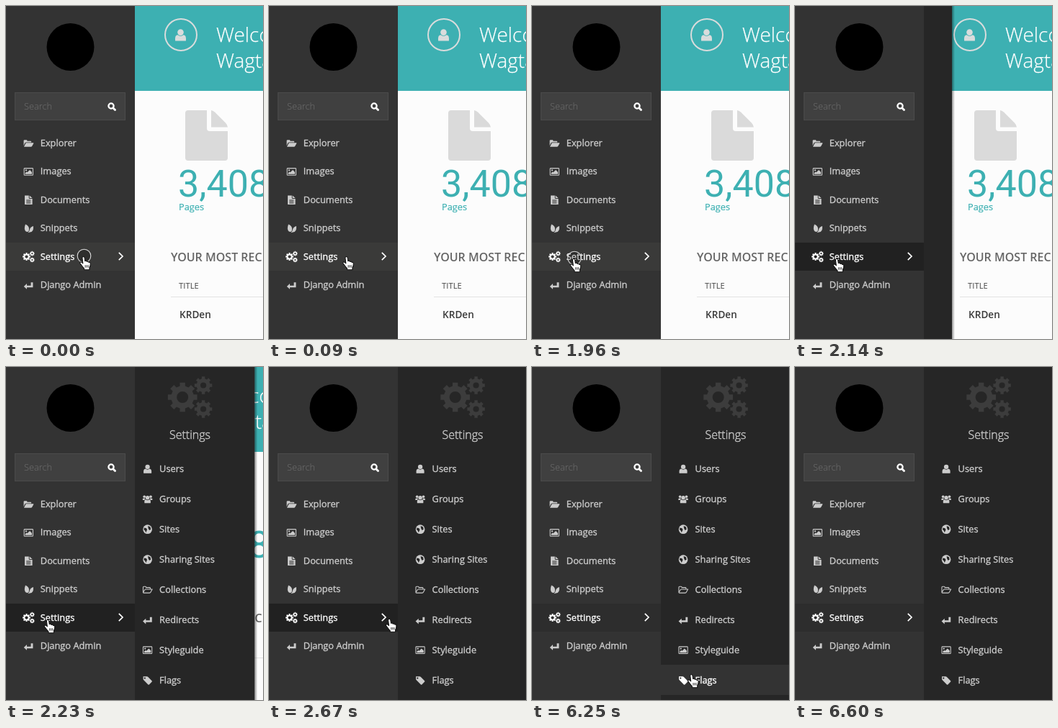
Write an HTML page that moves like this. It is 357 px wide and 463 px high and loops after 6960 ms.

```html
<!DOCTYPE html>
<html lang="en">
<head>
<meta charset="utf-8">
<title>Settings menu</title>
<style>
html, body { margin: 0; width: 100%; height: 100%; overflow: hidden; background: #333; }
svg { display: block; width: 100%; height: 100%; }
text { font-family: "Open Sans", sans-serif; font-size: 12.8px; }
.item { fill: #ccc; color: #ccc; stroke: #ccc; stroke-width: .35px; }
.item.on { fill: #fff; color: #fff; stroke: #fff; }
.item use { stroke: none; }
.light { font-weight: 300; }
.semi { font-weight: 600; }
</style>
</head>
<body>
<svg viewBox="0 0 357 463" preserveAspectRatio="none">
  <defs>
    <linearGradient id="shade">
      <stop offset="0" stop-opacity=".4"/><stop offset="1" stop-opacity="0"/>
    </linearGradient>
    <!-- icons are centred on 0,0 and about 14 wide -->
    <g id="folder">
      <path d="M-7 3.5V-4Q-7-5-6-5H-3Q-2-5-2-4V-3.5H3Q4-3.5 4-2.5V-1.5H-3Q-4.6-1.5-5.4-.2Z"/>
      <path d="M-6.6 5-4-.2Q-3.6-.8-3-.8H6.8Q7.8-.8 7.2.2L5 4.2Q4.5 5 3.6 5Z"/>
    </g>
    <g id="folderline" style="fill:none;stroke:currentColor;stroke-width:1.1px;stroke-linejoin:round">
      <path d="M-6.4 3.6V-3.5Q-6.4-4.6-5.4-4.6H-3Q-2-4.6-2-3.2H3Q4-3.2 4-2.2V-.8M-6.4 4 -3.8-.2Q-3.4-.8-2.8-.8H6.8L4.4 3.8Q4 4.6 3 4.6H-5.6Q-6.4 4.6-6.4 3.6Z"/>
    </g>
    <g id="image">
      <rect x="-6.4" y="-5" width="12.8" height="10" rx=".8" style="fill:none;stroke:currentColor;stroke-width:1.1px"/>
      <circle cx="-3.5" cy="-2.2" r="1.2"/>
      <path d="M-4.9 3.6V2L-2.8 0-1.7 1 1.8-2.4 4.9.6V3.6Z"/>
    </g>
    <g id="doc">
      <path fill-rule="evenodd" d="M-5.5-6.5H.4V-2.8Q.4-2 1.2-2H5.5V6.5H-5.5ZM-3.2-.2V.8H3.2V-.2ZM-3.2 1.8V2.8H3.2V1.8ZM-3.2 3.8V4.8H3.2V3.8Z"/>
      <path d="M1.4-6.5 5.5-3H1.4Z"/>
    </g>
    <g id="leaf">
      <path d="M-4.5-6Q2-3.5.6 3.2Q-.4 5.4-2.4 5Q-8 3-4.5-6Z"/>
      <path d="M7-3.4Q7.6 5.6 2 5.6L-1 6.4Q1.6 4.6 1.8 1.4Q2.6-2.2 7-3.4Z"/>
    </g>
    <g id="redirect">
      <path d="M-6.8 2-2.4-2V.7H3.4V-4H6.4V3.3H-2.4V6Z"/>
    </g>
    <g id="user">
      <circle cy="-3" r="3.3"/>
      <path d="M-5.7 6.2Q-6.4-.2-3-.2Q0 2.2 3-.2Q6.4-.2 5.7 6.2Z"/>
    </g>
    <g id="group">
      <circle cx="-4.6" cy="-3.6" r="1.9"/><circle cx="4.6" cy="-3.6" r="1.9"/>
      <path d="M-7 1.4V-.6Q-6.6-1.6-3.2-1.2L-4.4 1.4ZM7 1.4V-.6Q6.6-1.6 3.2-1.2L4.4 1.4Z"/>
      <circle cy="-2" r="2.8"/>
      <path d="M-4.4 5.8Q-5 .6-2.6.6Q0 2.4 2.6.6Q5 .6 4.4 5.8Z"/>
    </g>
    <g id="globe">
      <circle r="6.6"/>
      <path fill="#262626" d="M-4.8-2.4-1.6-1.6-.6.6-2.4 4.8-3.4 2.2-5.4.4ZM.6-5 4-3.6 4.8 0 2.6 1.4 1-1.4Z"/>
    </g>
    <g id="tag">
      <path fill-rule="evenodd" d="M-6.3-5.6H-1Q0-5.6.8-4.8L6.2.6Q7 1.4 6.2 2.2L2.4 6Q1.6 6.8.8 6L-5.6-.4Q-6.3-1-6.3-2ZM-4-4.5A1.2 1.2 0 1 0-3.9-4.5Z"/>
    </g>
    <g id="cogs"></g>
  </defs>

  <g id="page">
    <rect x="179" width="178" height="463" fill="#fcfcfc"/>
    <rect x="179" width="178" height="118" fill="#3db0b2"/>
    <circle cx="243" cy="40" r="22" fill="none" stroke="#d9dcdc" stroke-width="2"/>
    <use href="#user" transform="translate(242.5 40.5) scale(1.3)" fill="#d9dcdc"/>
    <g fill="#fff" stroke="#fff" stroke-width=".25" class="light">
      <text x="292" y="50" style="font-size:28px">Welcome</text>
      <text x="292" y="86" style="font-size:28px">Wagtail</text>
    </g>
    <g fill="#dadada">
      <path d="M253 145H279V170Q279 174 283 174H308V211Q308 215 304 215H253Q249 215 249 211V149Q249 145 253 145Z"/>
      <path d="M285 145Q288 145.500 290 147.500L305 162.500Q307.500 165 308 168.500H285Z"/>
    </g>
    <g fill="#3db0b2">
      <text x="239" y="264.500" style="font:52px Roboto,sans-serif">3,408</text>
      <text x="240" y="284" stroke="#3db0b2" stroke-width=".2">Pages</text>
    </g>
    <text x="229" y="355" class="semi" fill="#666" style="font-size:16px">YOUR MOST RECENT EDITS</text>
    <text x="240" y="393" fill="#444" style="font-size:11.3px">TITLE</text>
    <path d="M229 404.500H357" stroke="#e3e3e3"/>
    <text x="241" y="434" class="semi" fill="#3a3a3a" style="font-size:13.6px">KRDen</text>
  </g>

  <g id="sub">
    <rect x="359" width="4" height="463" fill="url(#shade)"/>
    <rect x="179" width="180" height="463" fill="#262626"/>
    <use href="#cogs" transform="translate(269 42)" fill="#3c3c3c"/>
    <text x="269" y="100" class="light" text-anchor="middle" fill="#ccc" stroke="#ccc" stroke-width=".4" style="font-size:16px">Settings</text>
    <rect id="subRow" x="179" width="180" height="42" fill="#333"/>
  </g>

  <g id="side">
    <rect width="179" height="463" fill="#333"/>
    <circle cx="89.500" cy="57" r="33"/>
    <rect x="12.500" y="120.500" width="153" height="38" fill="#404040" stroke="#4b4b4b"/>
    <text x="25" y="144" class="light" fill="#707070">Search</text>
    <g fill="none" stroke="#fff" stroke-width="2.300">
      <circle cx="146" cy="139" r="3.600"/>
      <path d="M149 142 151.500 144.500" stroke-width="2.800" stroke-linecap="round"/>
    </g>
    <rect id="mainRow" y="329" width="179" height="39"/>
    <path d="M156.800 342.800 162 348 156.800 353.200" fill="none" stroke="#fff" stroke-width="1.700"/>
  </g>

  <circle id="ring" r="9.300" fill="#000" fill-opacity=".2" stroke="#ddd" stroke-width="1.100"/>
  <g id="hand">
    <g transform="translate(-1 -1) scale(1.13)">
      <path d="M3.500 2Q3.500.500 4.900.500Q6.100.500 6.300 2L6.900 5.900Q8.400 5 9.300 6.600Q11 5.900 11.600 7.500Q13.500 7.100 13.500 9.200Q13.500 12 12.300 13.800V16.500H5.800V15Q3.600 12.600 2.500 10.900L.8 8.800Q.2 7.300 1.700 7.100Q3 7.100 4.300 8.800Z"
        fill="#fff" stroke="#111" stroke-width=".9" stroke-linejoin="round"/>
      <path d="M7.200 10.800V13.800M9 10.800V13.800M10.800 10.800V13.800" stroke="#222" stroke-width=".8"/>
    </g>
  </g>
</svg>
<script>
const LOOP = 6960;
const $ = id => document.getElementById(id);
const make = (parent, tag, attrs) => {
  const el = document.createElementNS("http://www.w3.org/2000/svg", tag);
  for (const key in attrs) el.setAttribute(key, attrs[key]);
  return parent.appendChild(el);
};

function gear(x, y, r, hole) {
  const point = (a, d) => `${(x + d * Math.cos(a)).toFixed(2)} ${(y + d * Math.sin(a)).toFixed(2)}`;
  const corners = [];
  for (let i = 0; i < 8; i++) {
    const a = i * Math.PI / 4;
    corners.push(point(a - .23, r * .77), point(a - .18, r), point(a + .18, r), point(a + .23, r * .77));
  }
  return `M${corners.join("L")}ZM${x + hole} ${y}a${hole} ${hole} 0 1 0 ${-2 * hole} 0a${hole} ${hole} 0 1 0 ${2 * hole} 0Z`;
}
make($("cogs"), "path", {
  "fill-rule": "evenodd",
  d: gear(-10.3, 0, 20.7, 8) + gear(18.6, -16.5, 12.4, 4.1) + gear(18.6, 16.5, 12.4, 4.1)
});

function addItem(parent, icon, label, x, y) {
  const g = make(parent, "g", { class: "item" });
  const scale = icon === "cogs" ? .27 : .96;
  make(g, "use", { href: "#" + icon, transform: `translate(${x - 16.5} ${y + .7}) scale(${scale})` });
  make(g, "text", { x, y: y + 4.7 }).textContent = label;
  return g;
}
const mainItems = [
  ["folder", "Explorer"], ["image", "Images"], ["doc", "Documents"],
  ["leaf", "Snippets"], ["cogs", "Settings"], ["redirect", "Django Admin"]
].map(([icon, label], i) => addItem($("side"), icon, label, 47.8, 190.3 + i * 39.4));
mainItems[4].classList.add("on");

const subItems = [
  ["user", "Users"], ["group", "Groups"], ["globe", "Sites"], ["globe", "Sharing Sites"],
  ["folderline", "Collections"], ["redirect", "Redirects"], ["image", "Styleguide"], ["tag", "Flags"]
].map(([icon, label], i) => addItem($("sub"), icon, label, 226.6, 141 + i * 42));

// Each move advances in n even ticks, the first one at its start time.
const moves = [
  { start: 1250, end: 1520, n: 4, to: [53.5, 352] },
  { start: 2410, end: 2760, n: 5, to: [222, 350], ease: u => u * u * (3 - 2 * u) },
  { start: 2850, end: 3370, n: 7, to: [214.5, 426], ease: u => u * (2 - u) },
  { start: 6250, end: 6600, n: 5, to: [273, 476], ease: u => u * u }
];

function ticks(t, start, end, n) {
  if (t < start) return 0;
  return Math.min(n, 1 + Math.floor((t - start) / ((end - start) / (n - 1)) + .01));
}

function cursorAt(t) {
  let pos = [103, 349];
  for (const { start, end, n, to, ease = u => u } of moves) {
    const u = ease(ticks(t, start, end, n) / n);
    pos = pos.map((v, i) => v + (to[i] - v) * u);
  }
  return pos;
}

const show = (id, visible) => $(id).setAttribute("visibility", visible ? "inherit" : "hidden");

function draw(t) {
  const [x, y] = cursorAt(t);
  const open = [0, .217, .925, 1][ticks(t, 2140, 2320, 3)];
  const overSub = x + 5 > 179;
  const hovered = overSub && y < 456 ? Math.floor((y - 120) / 42) : -1;

  show("sub", open > 0);
  $("sub").setAttribute("transform", `translate(${180 * (open - 1)} 0)`);
  $("mainRow").setAttribute("fill", !open ? "#3a3a39" : overSub ? "#2d2d2d" : "#212121");
  $("subRow").setAttribute("y", 120 + hovered * 42);
  show("subRow", hovered >= 0);
  subItems.forEach((item, i) => item.classList.toggle("on", i === hovered));

  show("ring", t < 90 || (t >= 1960 && t < 2140));
  $("ring").setAttribute("transform", `translate(${x + 5.5} ${y - 1.5})`);
  $("hand").setAttribute("transform", `translate(${x} ${y})`);
}

const began = performance.now();
function frame() {
  draw((performance.now() - began) % LOOP);
  requestAnimationFrame(frame);
}
frame();
</script>
</body>
</html>
```
